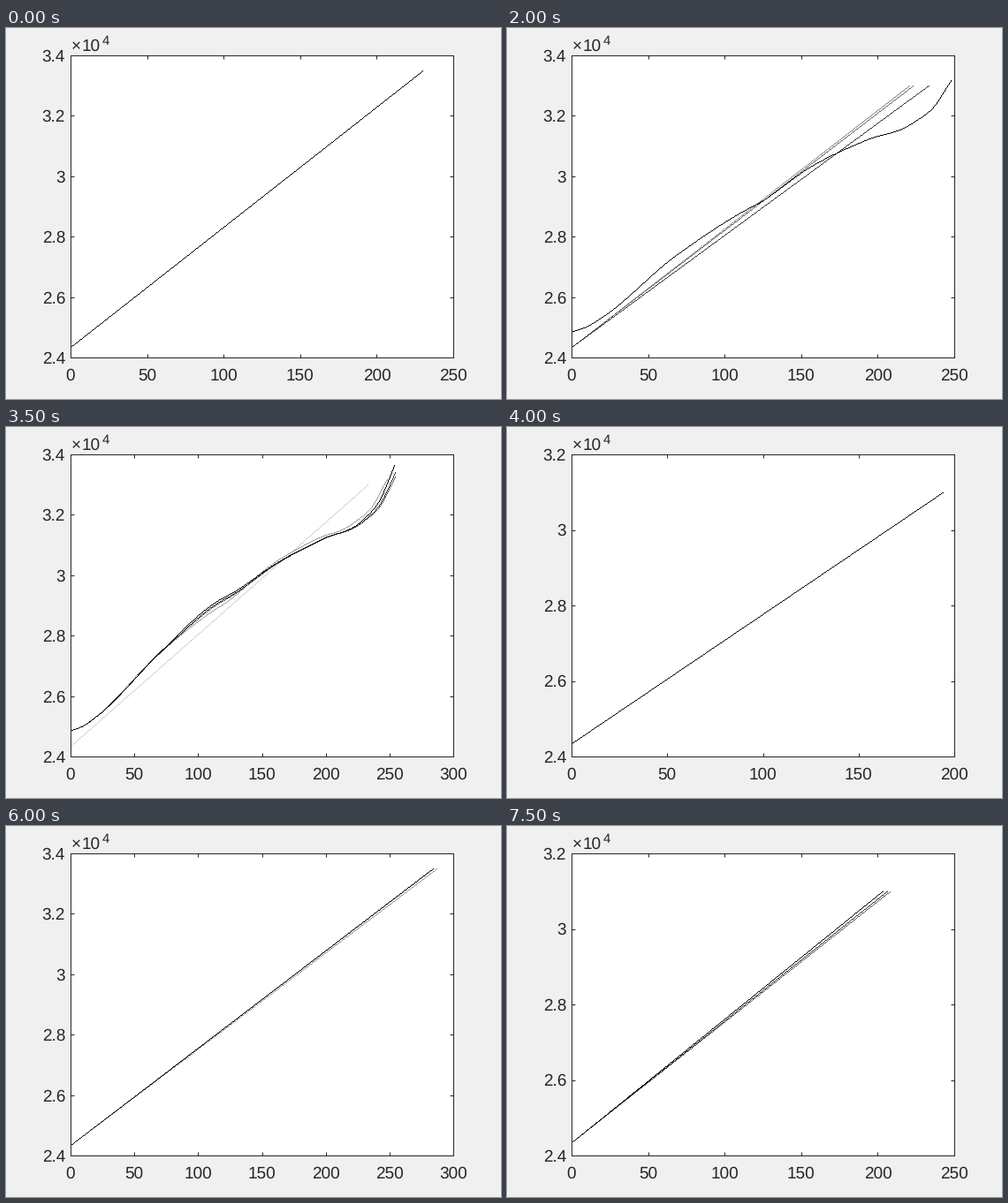
Recreate the animation shown at these times as a matplotlib script. Size 560x420 px, loop 8 s.

```python
import numpy as np
import matplotlib.pyplot as plt
from matplotlib.animation import FuncAnimation
from matplotlib.transforms import Affine2D

W, H = 560, 420
LEFT, RIGHT, LOW, HIGH = 73, 506, 47, 389  # plot box, y measured upwards
INK = "#262626"
PT = 0.72  # points per pixel at 100 dpi
TRAIL = 5
START = 2.435

plt.rcParams["font.family"] = "Liberation Sans"
plt.rcParams["text.hinting"] = "no_hinting"
fig = plt.figure(figsize=(W / 100, H / 100), dpi=100, facecolor="#f0f0f0")
ax = fig.add_axes([LEFT / W, LOW / H, (RIGHT - LEFT) / W, (HIGH - LOW) / H])
pixels = Affine2D().scale(1 / W, 1 / H) + fig.transFigure


def smooth(points, n=300):
    """Cubic Hermite curve through the given points."""
    xs, ys = np.array(points).T
    slope = np.gradient(ys, xs)
    x = np.linspace(xs[0], xs[-1], n)
    i = np.clip(np.searchsorted(xs, x, side="right") - 1, 0, len(xs) - 2)
    h = xs[i + 1] - xs[i]
    t = (x - xs[i]) / h
    y = ((1 + 2 * t) * (1 - t) ** 2 * ys[i] + t * (1 - t) ** 2 * h * slope[i]
         + t * t * (3 - 2 * t) * ys[i + 1] + t * t * (t - 1) * h * slope[i + 1])
    return x, y


BEND = smooth([(0, 2.486), (10, 2.503), (20, 2.533), (70, 2.747), (114, 2.913),
               (128, 2.946), (160, 3.038), (197, 3.121), (228, 3.181),
               (242, 3.25), (253.6, 3.366)])


def ramps(top, lengths):
    return [(np.array([0, n]), np.array([START, top])) for n in lengths]


def bend(length, top, dip):
    """The curve stretched to a new end, with a shallow dip half way."""
    x, y = BEND
    x = x * length / x[-1]
    tail = np.clip((x - 205) / (length - 205), 0, 1) ** 3
    return x, y + (top - y[-1]) * tail - dip * np.exp(-((x - 110) / 35) ** 2)


tracks = {
    "A": ramps(3.35, [230] * 5 + [283, 287] + [284] * 4),
    "B": ramps(3.3, [238, 220, 220.6, 223, 233]) + [
        bend(247.7, 3.317, 0.03), bend(254.5, 3.328, 0.01),
        bend(254.5, 3.343, 0.006), bend(253.6, 3.366, 0), bend(253, 3.397, 0)],
    "C": ramps(3.1, [230, 203, 203, 208, 206, 203]),
    "D": ramps(3.1, [194] * TRAIL),
}
ORDER = "AABABBBBDBAAACAC"


def label(x, y, text, size=19, ha="left"):
    ax.text(x, y, text, transform=pixels, fontsize=size * PT, color=INK,
            ha=ha, va="baseline")


def draw_axes(xmax, ymax):
    xticks = np.arange(0, xmax + 1, 50)
    yticks = np.arange(2.4, ymax + 0.05, 0.2)
    ax.set(xlim=(0, xmax), ylim=(2.4, ymax), xticks=xticks, yticks=yticks)
    ax.tick_params(direction="in", length=4 * PT, width=PT, color=INK, top=True,
                   right=True, labelbottom=False, labelleft=False)
    for spine in ax.spines.values():
        spine.set(color=INK, linewidth=PT)
    for v in xticks:
        label(LEFT + v / xmax * (RIGHT - LEFT), 21.5, f"{v:g}", ha="center")
    for v in yticks:
        y = LOW + (v - 2.4) / (ymax - 2.4) * (HIGH - LOW)
        label(67, y - 6.8, f"{v:.3g}", ha="right")
    label(74, 394, "×")
    label(86, 394, "10")
    label(109, 401, "4", 15)


def draw_line(x, y, xmax, ymax, shade):
    """Hard-edged rising line, one pixel thick, without antialiasing."""
    px = LEFT + 0.5 + x / xmax * (RIGHT - LEFT)
    py = LOW - 0.5 + (y - 2.4) / (ymax - 2.4) * (HIGH - LOW)
    cols = np.arange(LEFT, int(px[-1]) + 1)
    rows = np.floor(np.interp(cols + 0.5, px, py))
    base = rows.copy()
    base[1:] = np.minimum(rows[1:], rows[:-1] + 1)  # fill steep steps
    ax.stairs(rows + 1, np.append(cols, cols[-1] + 1), baseline=base, fill=True,
              color=str(shade), linewidth=0, transform=pixels)


def update(i):
    ax.clear()
    name = ORDER[i]
    count = TRAIL + ORDER[:i].count(name)
    shown = tracks[name][count - TRAIL:count]
    xmax = 50 * np.ceil(max(x[-1] for x, _ in shown) / 50)
    ymax = round(0.2 * np.ceil(max(y[-1] for _, y in shown) / 0.2), 1)
    draw_axes(xmax, ymax)
    for k, (x, y) in enumerate(shown):
        draw_line(x, y, xmax, ymax, 1 - (k + 1) / TRAIL)
    return []


anim = FuncAnimation(fig, update, frames=len(ORDER), init_func=lambda: [],
                     interval=500, repeat=True, repeat_delay=0)
plt.show()
```
